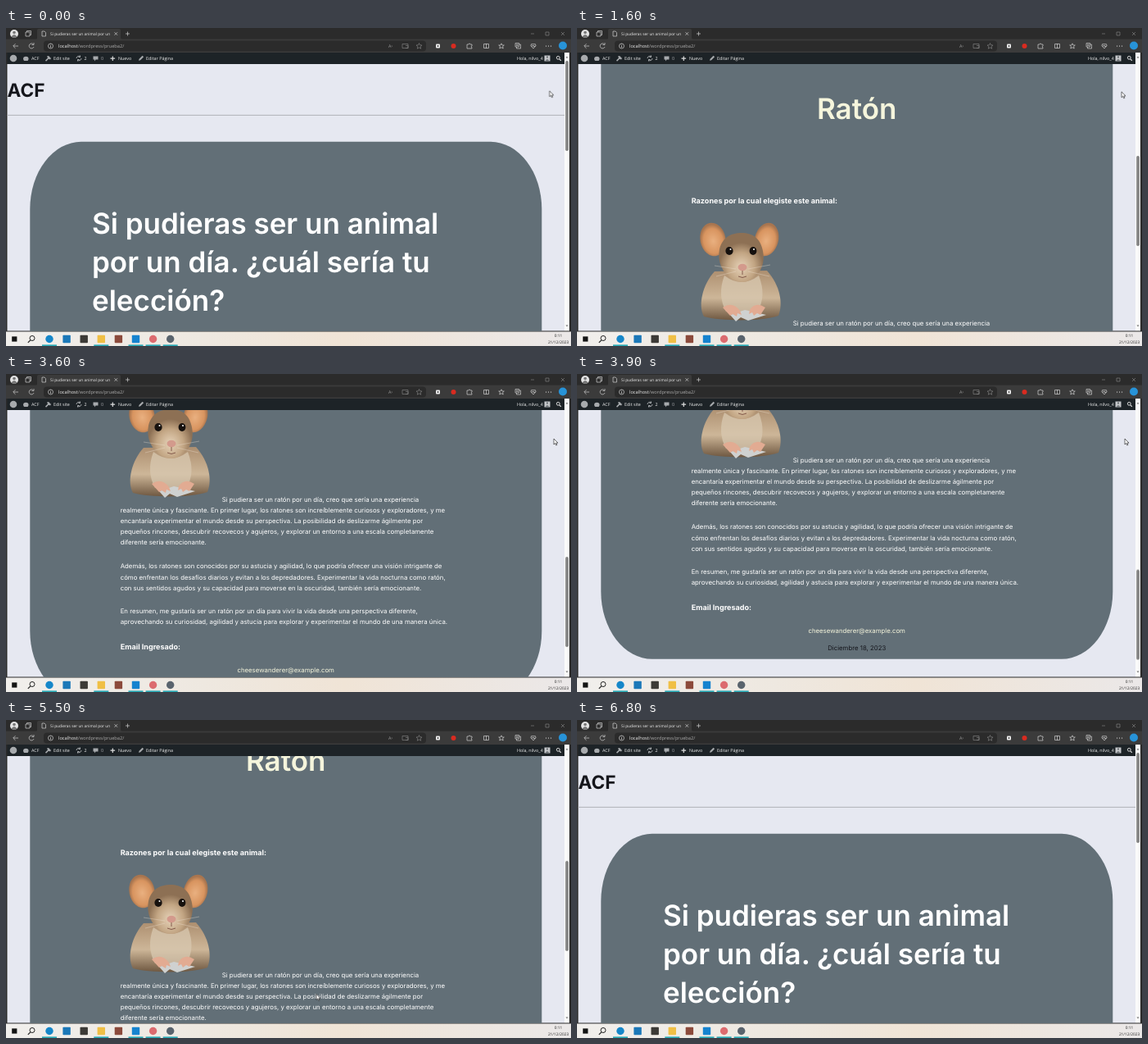
An HTML page that plays this animation: 690 px wide and 388 px high, repeating every 6900 ms.

```html
<!DOCTYPE html>
<html lang="es">
<head>
<meta charset="utf-8">
<title>Si pudieras ser un animal por un día</title>
<style>
html, body { margin: 0; width: 100%; height: 100%; overflow: hidden; background: #2b2b2b; }
svg { display: block; width: 100%; height: 100%; }
text { text-rendering: geometricPrecision; font-optical-sizing: none; white-space: pre; }
.ui { font: 5.4px "Open Sans", "Noto Sans", sans-serif; fill: #eee; }
.page { font: 7.8px Inter, "Open Sans", sans-serif; fill: #fff; }
.page .h1 { font-size: 35px; font-weight: 600; }
.page .h3 { font-size: 9.05px; font-weight: 700; }
.page .cream { fill: #f5f5dc; }
.page .dark { fill: #15161c; }
.mid { text-anchor: middle; }
.line { fill: none; stroke: #d0d0d0; stroke-width: .7; }
.dim { stroke: #8c8c8c; stroke-width: .6; }
</style>
</head>
<body>
<svg viewBox="0 0 690 388">
  <defs>
    <clipPath id="view"><rect x="1.5" y="44" width="680.5" height="325.5"/></clipPath>
    <linearGradient id="bar">
      <stop offset="0" stop-color="#f1efec"/><stop offset=".35" stop-color="#eee8e0"/>
      <stop offset=".6" stop-color="#f0e4d6"/><stop offset="1" stop-color="#ebe8e8"/>
    </linearGradient>
    <radialGradient id="ear" cy=".55"><stop offset="0" stop-color="#e9b080"/><stop offset=".75" stop-color="#d8945f"/><stop offset="1" stop-color="#a8754f"/></radialGradient>
    <radialGradient id="face" cy=".7"><stop offset="0" stop-color="#e6d2b8"/><stop offset=".6" stop-color="#c2a583"/><stop offset="1" stop-color="#8d7054"/></radialGradient>
    <linearGradient id="fur" x2="0" y2="1"><stop offset="0" stop-color="#ad8f70"/><stop offset=".55" stop-color="#cdb698"/><stop offset="1" stop-color="#6f5841"/></linearGradient>
  </defs>

  <!-- Page -->
  <rect x="1.5" y="44" width="680.5" height="325.5" fill="#e6e8f1"/>
  <g clip-path="url(#view)">
    <g id="doc" class="page">
      <text class="dark" x="1.5" y="84" style="font-size:22.6px;font-weight:700">ACF</text>
      <path d="M1 106.4H682M1 992.3H682" stroke="#a3a5ab" stroke-width=".8"/>
      <rect x="29.3" y="138.8" width="625" height="822" rx="62.5" ry="82.2" fill="#626f77"/>
      <g id="copy"></g>
      <g transform="translate(0 358)">
        <path d="M155 352C147 338 154 312 168 297L232 296C248 314 252 336 246 351C228 358 176 358 155 352Z" fill="url(#fur)"/>
        <path d="M180 302Q201 318 222 302Q232 328 220 346H182Q171 326 180 302Z" fill="#d9c8b0" opacity=".75"/>
        <ellipse cx="166" cy="258" rx="15.5" ry="20.5" transform="rotate(-12 166 258)" fill="url(#ear)"/>
        <ellipse cx="231.5" cy="258" rx="14.5" ry="20.5" transform="rotate(14 231.5 258)" fill="url(#ear)"/>
        <path d="M174 270C178 254 190 250 201 250C214 250 224 256 227 272C231 292 219 309 202 310C185 309 170 292 174 270Z" fill="url(#face)"/>
        <g fill="#16110e"><ellipse cx="186" cy="272" rx="4.6" ry="5"/><ellipse cx="215" cy="272" rx="4.4" ry="5"/></g>
        <g fill="#fff"><circle cx="187.5" cy="270" r="1"/><circle cx="216" cy="270" r="1"/></g>
        <ellipse cx="202" cy="292" rx="5.5" ry="4.2" fill="#d39a8c"/>
        <path d="M202 296V301M197 303Q202 306 207 303" fill="none" stroke="#7b5143" stroke-width=".9"/>
        <path d="M194 294L168 290M194 297L170 303M209 294L236 289M209 297L235 303" stroke="#efe5d5" stroke-width=".35"/>
        <path d="M187 350L205 344L231 350L209 357L200 353L194 358Z" fill="#cfd1d0"/>
        <path d="M178 341Q190 333 199 345L201 350L196 348L195 352L190 349L187 351Z" fill="#e2ab92"/>
        <path d="M230 341Q218 333 211 344L210 349L214 347L216 351L220 348L224 350Z" fill="#e2ab92"/>
      </g>
    </g>
  </g>

  <!-- Browser frame -->
  <g class="ui">
    <rect width="690" height="30" fill="#2b2b2b"/>
    <path d="M0 13.5H37Q38 13.5 38 12V3Q38 1 40 1H138Q140 1 140 3V12Q140 13.5 142 13.5H690V30H0Z" fill="#3b3b3b"/>
    <rect x="46" y="15.5" width="467" height="13" rx="4" fill="#2b2b2b"/>
    <circle cx="10" cy="7" r="5" fill="#e4e4e4"/>
    <path d="M6.500 10.500Q10 5.500 13.500 10.500Q10 13.500 6.500 10.500Z" fill="#777"/><circle cx="10" cy="5.5" r="1.8" fill="#777"/>
    <path class="line" d="M24 5h5v5h-5zM25.500 5V3.500H30.500V8.500H29M44 4h3l1.500 1.500V10H44zM132.500 5.200l3.600 3.600m0-3.600l-3.600 3.600M146 7h5m-2.500-2.500v5"/>
    <path class="line dim" d="M641 7h4M659 5h4v4h-4zM678 5l4 4m0-4l-4 4M484 19.500h7v5h-7zM488 21.500h3v3h-3M504.500 18.500l1 2.300 2.500.2-1.900 1.700.6 2.500-2.200-1.300-2.200 1.300.6-2.500-1.900-1.700 2.500-.2z"/>
    <text x="54" y="9" style="font-size:4.85px">Si pudieras ser un animal por un</text>
    <path class="line" d="M15 22H9m2.500-2.800L8.700 22l2.800 2.800M33.500 20a3 3 0 1 0 .5 3M34 18v2.500h-2.500M54.500 21v3m0-4.500v.7"/>
    <circle class="line" cx="54.5" cy="22" r="3"/>
    <text x="64" y="24" style="font-size:5.7px">localhost<tspan fill="#aaa">/wordpress/prueba2/</tspan></text>
    <text x="467" y="24" fill="#999">A<tspan font-size="3.5" dy="-1.5">»</tspan></text>
    <rect x="525" y="19.5" width="5" height="5" rx="1" fill="#eee"/><circle cx="527.5" cy="22" r="1" fill="#444"/>
    <circle cx="546.5" cy="22" r="3" fill="#d92b20"/>
    <path class="line" d="M563 20h2q1-2.500 2 0h2v2q-2 .5 0 2v1h-6zM583.500 19.500h6v5h-6zM586.500 19v6M605 18.800l1 2.200h2.300l-1.700 1.500.6 2.500-2.200-1.300-2.200 1.300.6-2.500L601.700 21h2.300zM622 18.500h4.500v4.500H622zM623.500 23v2h5v-5h-2M624.200 19.500v2.500m-1.300-1.200h2.600M644 25l-3-3.300q-.5-3 3-2 3.500-1 3 2zM641.500 22h1.500l1-1 1 2 .7-1h1"/>
    <path d="M659.500 22h.1M662.500 22h.1M665.500 22h.1" stroke="#eee" stroke-width="1.2" stroke-linecap="round"/>
    <circle cx="680" cy="21.5" r="5" fill="#2793d8"/>

    <!-- Admin bar -->
    <rect x="1.5" y="30" width="680.5" height="14" fill="#1d2327"/>
    <circle cx="9" cy="37" r="4.3" fill="#a7aaad"/>
    <path d="M21 38a3.300 3.300 0 0 1 6.600 0l-1 2h-4.600zM48 39.500l3-3-1-2 2-.5 3 3-1 1.500-2-.8-3 3zM106.500 34.500h6v4h-3l-1.500 2v-2h-1.500zM162 39.800l.6-2 4-4 1.500 1.500-4 4z" fill="#a7aaad"/>
    <path d="M86 37a3 3 0 0 1 5-2m1 2a3 3 0 0 1-5 2M90.500 33.500v2h-2M87.500 40.500v-2h2" fill="none" stroke="#a7aaad"/>
    <path d="M127.500 37.200h5.600m-2.800-2.800v5.600" stroke="#ddd" stroke-width="1.2"/>
    <g id="admin"></g>
    <rect x="657.5" y="33.5" width="7" height="7" fill="#c4c6c9"/><path d="M658.500 40.500q2.500-5 5 0zM660 34.500h2v2h-2z" fill="#6d7277"/>
    <circle cx="674.3" cy="36.3" r="1.9" fill="none" stroke="#ddd"/><path d="M675.800 37.800l2 2" stroke="#ddd" stroke-width="1.2"/>
  </g>

  <!-- Scrollbar -->
  <rect x="682" y="30" width="6" height="339.5" fill="#fafafa"/>
  <path d="M683.500 36.500L685 34.500L686.500 36.500ZM683.500 362.500L685 364.500L686.500 362.500Z" fill="#777"/>
  <rect id="thumb" x="683.2" y="40" width="3.7" height="110" rx="1.8" fill="#858585"/>

  <!-- Taskbar -->
  <rect y="370.5" width="690" height="17.5" fill="url(#bar)"/>
  <rect x="7.2" y="376.4" width="6.2" height="6.2" fill="#151515"/>
  <circle cx="32" cy="378.5" r="3" fill="none" stroke="#222"/><path d="M29.800 380.800l-3 3" stroke="#222" stroke-width="1.2"/>
  <g id="apps"></g>
  <g class="ui mid" style="font-size:4.75px">
    <text x="674.5" y="377.3" fill="#222">0:11</text>
    <text x="674.5" y="385" fill="#222">21/12/2023</text>
  </g>

  <path id="cursor" d="M0 0V7L1.700 5.500 2.800 8 3.900 7.500 2.800 5.100H5Z" fill="#fff" stroke="#111" stroke-width=".6"/>
</svg>
<script>
const LOOP = 6900, STEP = 100, MAX_SCROLL = 645, THUMB_TRAVEL = 209;
const byId = id => document.getElementById(id);

function add(parent, tag, attrs, content = '') {
  const el = document.createElementNS('http://www.w3.org/2000/svg', tag);
  for (const name in attrs) el.setAttribute(name, attrs[name]);
  el.textContent = content;
  byId(parent).append(el);
}

const write = (x, y, content, cls = '') => add('copy', 'text', { x, y, class: cls }, content);
const paragraph = (y, lines, indent = 0) =>
  lines.forEach((line, i) => write(139.7 + (i ? 0 : indent), y + i * 13.15, line));

['Si pudieras ser un animal', 'por un día. ¿cuál sería tu', 'elección?']
  .forEach((line, i) => write(105, 251.3 + i * 46.6, line, 'h1'));
write(341.7, 468.7, 'Ratón', 'h1 mid cream');
write(139.7, 572.2, 'Razones por la cual elegiste este animal:', 'h3');
paragraph(720.7, [
  'Si pudiera ser un ratón por un día, creo que sería una experiencia',
  'realmente única y fascinante. En primer lugar, los ratones son increíblemente curiosos y exploradores, y me',
  'encantaría experimentar el mundo desde su perspectiva. La posibilidad de deslizarme ágilmente por',
  'pequeños rincones, descubrir recovecos y agujeros, y explorar un entorno a una escala completamente',
  'diferente sería emocionante.'
], 124);
paragraph(802.4, [
  'Además, los ratones son conocidos por su astucia y agilidad, lo que podría ofrecer una visión intrigante de',
  'cómo enfrentan los desafíos diarios y evitan a los depredadores. Experimentar la vida nocturna como ratón,',
  'con sus sentidos agudos y su capacidad para moverse en la oscuridad, también sería emocionante.'
]);
paragraph(857.3, [
  'En resumen, me gustaría ser un ratón por un día para vivir la vida desde una perspectiva diferente,',
  'aprovechando su curiosidad, agilidad y astucia para explorar y experimentar el mundo de una manera única.'
]);
write(139.7, 900.7, 'Email Ingresado:', 'h3');
write(341.7, 928.8, 'cheesewanderer@example.com', 'mid cream');
write(341.7, 949.7, 'Diciembre 18, 2023', 'mid dark');
write(1.8, 1009.7, 'ACF es gestionado con WordPress', 'dark');

[[31, 'ACF'], [58, 'Edit site'], [95.5, '2'], [116, '0'], [137, 'Nuevo'], [171, 'Editar Página'], [624, 'Hola, nilvo_4']]
  .forEach(([x, label]) => add('admin', 'text', { x, y: 39, fill: label === '0' ? '#a7aaad' : '#eee' }, label));

// [colour, round, running]
[['#1687c9', 1, 1], ['#1b78b8', 0, 0], ['#3c3a36', 0, 0], ['#f0bf45', 0, 1], ['#8c4a3b', 0, 0],
 ['#1583cf', 0, 1], ['#dc6b6f', 1, 1], ['#59636d', 1, 1]].forEach(([fill, round, running], i) => {
  const x = 53 + i * 21.1;
  add('apps', 'rect', { x: x - 4.7, y: 374.8, width: 9.4, height: 9.4, rx: round ? 4.7 : .8, fill });
  if (running) add('apps', 'rect', { x: x - 9, y: 386.4, width: 18, height: 1.6, fill: '#27a9b5' });
});

// Rows are [time, ...values], joined by straight lines.
const scroll = [[0, 0], [100, 8], [1500, 345], [1600, 358], [1750, 358], [2350, 460], [3000, 460], [3400, 565],
  [3600, 565], [4100, 645], [4950, 645], [5500, 407], [6500, 0], [LOOP, 0]];
const pointer = [[0, 663.7, 76.7, 1], [1600, 665, 77.7, 1], [2600, 668, 78.7, 1], [3600, 669, 79, 1], [4200, 669, 79, 1],
  [4700, 335.5, 340, 1], [4950, 335.5, 340, 1], [5400, 379, 334.5, 1], [6300, 379, 334.5, 1], [6301, 379, 334.5, 0],
  [LOOP, 379, 334.5, 0]];

function sample(rows, time) {
  const next = Math.max(1, rows.findIndex(row => row[0] > time));
  const [t0, ...from] = rows[next - 1], [t1, ...to] = rows[next];
  return from.map((v, i) => v + (to[i] - v) * (time - t0) / (t1 - t0));
}

function play(id, rows, style) {
  const frames = [];
  for (let time = 0; time < LOOP; time += STEP)
    frames.push({ ...style(...sample(rows, time)), offset: time / LOOP, easing: 'step-end' });
  frames.push({ ...frames.at(-1), offset: 1 });
  byId(id).animate(frames, { duration: LOOP, iterations: Infinity });
}

const move = (x, y) => ({ transform: `translate(${x}px, ${y}px)` });
play('doc', scroll, y => move(0, -y));
play('thumb', scroll, y => move(0, y / MAX_SCROLL * THUMB_TRAVEL));
play('cursor', pointer, (x, y, opacity) => ({ ...move(x, y), opacity }));
</script>
</body>
</html>
```
